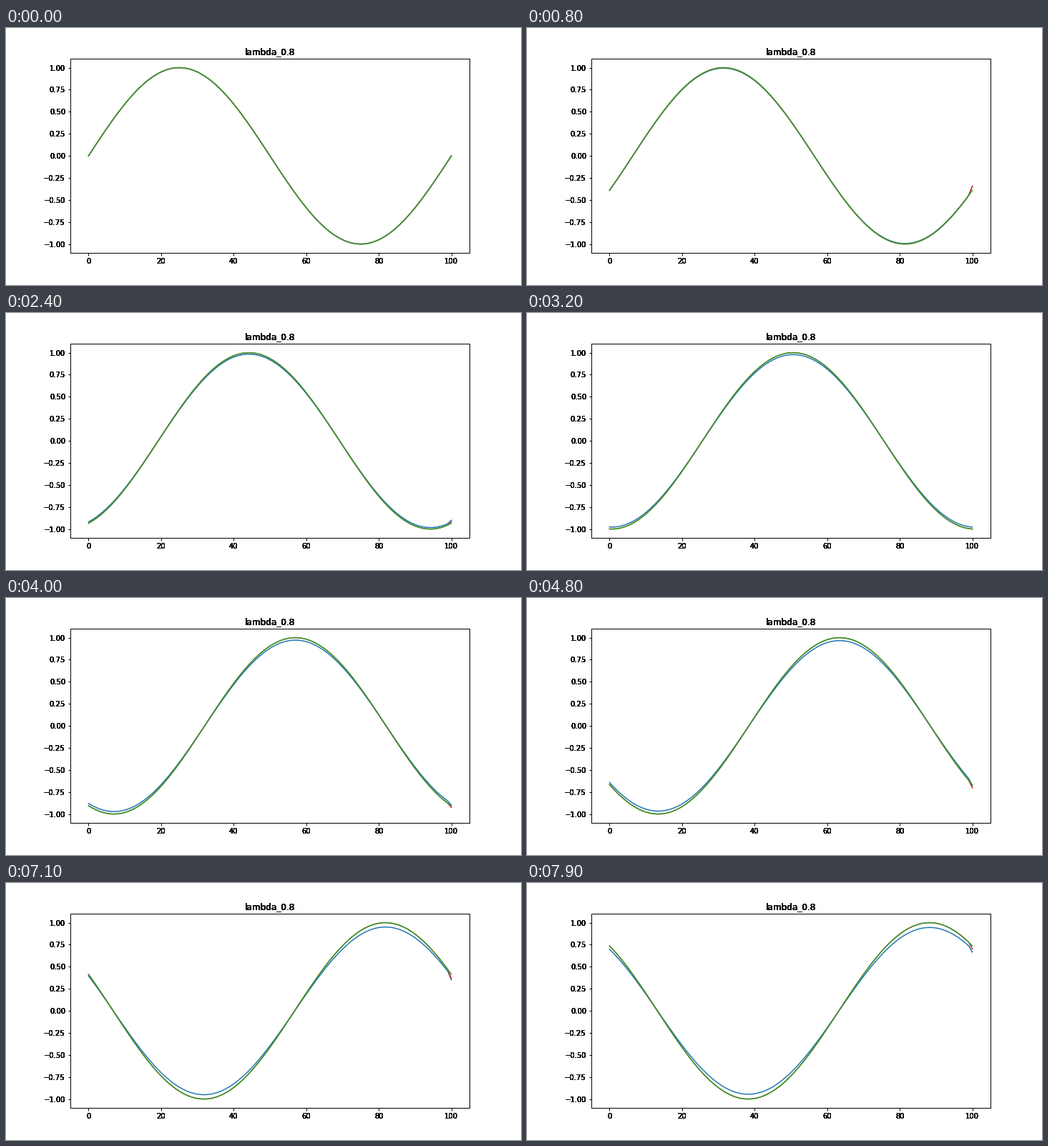
A matplotlib script that plays this animation: 720 by 360 pixels, repeating every 8000 ms.

```python
import numpy as np
import matplotlib.pyplot as plt
from matplotlib.animation import FuncAnimation

LAM = 0.8      # Courant number
CELLS = 100
FRAMES = 80
INK = 10       # overprints that make the lettering crisp and heavy

plt.rcParams.update({"font.family": "DejaVu Sans", "font.size": 10})


def lax_friedrichs(u):
    left, right = np.roll(u, 1), np.roll(u, -1)
    return (left + right) / 2 - LAM / 2 * (right - left)


def lax_wendroff(u):
    left, right = np.roll(u, 1), np.roll(u, -1)
    return u - LAM / 2 * (right - left) + LAM**2 / 2 * (right - 2 * u + left)


def solve(step):
    """All time levels; the right end copies the left end one step late."""
    u = np.sin(2 * np.pi * np.arange(CELLS) / CELLS)
    rows, end = [], u[0]
    for _ in range(FRAMES):
        rows.append(np.append(u, end))
        end = u[0]
        u = step(u)
    return rows


x = np.arange(CELLS + 1)
exact = [np.sin(2 * np.pi * (x - LAM * n) / CELLS) for n in range(FRAMES)]
curves = [solve(lax_friedrichs), solve(lax_wendroff), exact]
colors = ["tab:blue", "tab:red", "tab:green"]

fig = plt.figure(figsize=(10, 5), dpi=72, facecolor="white")
ax = fig.add_axes([0.125, 0.125, 0.775, 0.755])
ax.set(xlim=(-5, 105), ylim=(-1.1, 1.1))
ax.set_xticks(range(0, 101, 20))
ax.set_yticks(np.linspace(-1, 1, 9))
ax.tick_params(width=1, labelbottom=False, labelleft=False)
for spine in ax.spines.values():
    spine.set_linewidth(1)


def label(text, xy, coords, offset, ha, va, size=10):
    for _ in range(INK):
        ax.annotate(text, xy, xycoords=coords, xytext=offset,
                    textcoords="offset points", ha=ha, va=va,
                    fontsize=size, annotation_clip=False)


for t in ax.get_xticks():
    label(f"{t:.0f}", (t, 0), ("data", "axes fraction"), (0, -7),
          "center", "top")
for t in ax.get_yticks():
    label(f"{t:.2f}".replace("-", "\u2212"), (0, t),
          ("axes fraction", "data"), (-7, 0), "right", "center_baseline")
label(f"lambda_{LAM}", (0.5, 1), "axes fraction", (0, 6),
      "center", "baseline", 12)

lines = [ax.plot(x, c[0], color=col, lw=1.5)[0]
         for c, col in zip(curves, colors)]


def update(n):
    for line, curve in zip(lines, curves):
        line.set_ydata(curve[n])
    return lines


anim = FuncAnimation(fig, update, frames=FRAMES, interval=100,
                     repeat=True, repeat_delay=0, blit=False)
plt.show()
```
